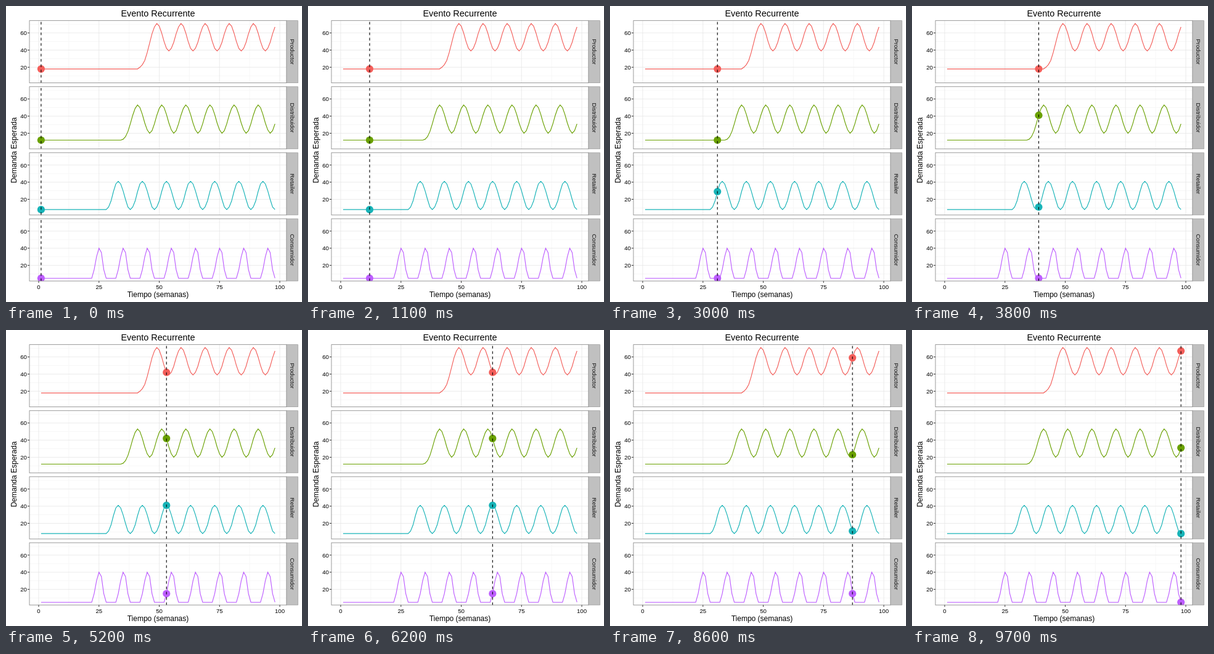
Animation, 480 px wide and 480 px high, one loop 9800 ms. Source, as an HTML page:

```html
<!DOCTYPE html>
<html lang="es">
<head>
<meta charset="utf-8">
<title>Evento Recurrente</title>
<style>
  html, body { margin: 0; width: 100%; height: 100%; overflow: hidden; background: #fff; }
  svg { display: block; width: 480px; height: 480px; font: 9.6px "Liberation Sans", Arial, sans-serif; }
</style>
</head>
<body>
<svg id="chart" viewBox="0 0 480 480"></svg>
<script>
const WEEKS = 98, STEP = 100;
const LEFT = 38, RIGHT = 455, STRIP_END = 473.5, TOP = 23.7, HEIGHT = 101, PITCH = 107.1;
const chart = document.getElementById('chart');

function add(parent, tag, attrs, text) {
  const el = document.createElementNS('http://www.w3.org/2000/svg', tag);
  for (const key in attrs) el.setAttribute(key, attrs[key]);
  if (text !== undefined) el.textContent = text;
  parent.append(el);
  return el;
}
const line = (parent, x1, y1, x2, y2, stroke, width, extra) =>
  add(parent, 'line', { x1, y1, x2, y2, stroke, 'stroke-width': width, ...extra });
const label = (text, x, y, extra) =>
  add(chart, 'text', { x, y, 'text-anchor': 'middle', ...extra }, text);

const xAt = week => 53 + 3.91 * week;
const yAt = (value, row) => 127.1 + PITCH * row - 1.39 * value;

// Each supplier orders 1.5 times a delayed five-week average of its client's demand.
const consumer = week => week < 23 ? 5 : [5, 5, 5, 15, 30, 40, 35, 15, 5, 5][week % 10];
const supplier = client => week => {
  let sum = 0;
  for (let lag = 6; lag <= 10; lag++) sum += client(week - lag);
  return Math.round(sum * 3 / 10);
};
const retailer = supplier(consumer);
const distributor = supplier(retailer);
const producer = supplier(distributor);

const panels = [
  ['Productor', '#f35e5a', producer],
  ['Distribuidor', '#69a000', distributor],
  ['Retailer', '#17b3b7', retailer],
  ['Consumidor', '#bd5eff', consumer]
].map(([name, color, demand], row) => {
  const top = TOP + PITCH * row, bottom = top + HEIGHT, middle = top + HEIGHT / 2;
  const clip = add(chart, 'clipPath', { id: 'clip' + row });
  add(clip, 'rect', { x: LEFT, y: top, width: RIGHT - LEFT, height: HEIGHT });
  const plot = add(chart, 'g', { 'clip-path': `url(#clip${row})` });

  const grid = (first, stroke, width) => {
    for (let v = 10 + first * 10; v <= 70; v += 20)
      line(plot, LEFT, yAt(v, row), RIGHT, yAt(v, row), stroke, width);
    for (let w = first ? 0 : 12.5; w <= 100; w += 25)
      line(plot, xAt(w), top, xAt(w), bottom, stroke, width);
  };
  grid(0, '#f7f7f7', 1);
  grid(1, '#e6e6e6', 0.8);

  const values = Array.from({ length: WEEKS }, (_, i) => demand(i + 1));
  const points = values.map((v, i) => `${xAt(i + 1).toFixed(2)},${yAt(v, row).toFixed(2)}`).join(' ');
  add(plot, 'polyline', { points, fill: 'none', stroke: color, 'stroke-width': 1.15 });
  const dot = add(plot, 'circle', { r: 6.1, fill: color });
  const cursor = line(plot, 0, bottom, 0, top, '#000', 1.1, { 'stroke-dasharray': '4.3 4.3' });

  add(chart, 'rect', { x: LEFT, y: top, width: RIGHT - LEFT, height: HEIGHT,
    fill: 'none', stroke: '#808080', 'stroke-width': 0.8 });
  add(chart, 'rect', { x: RIGHT, y: top, width: STRIP_END - RIGHT, height: HEIGHT,
    fill: '#c0c0c0', stroke: '#909090', 'stroke-width': 0.6 });
  label(name, 0, 0, { transform: `translate(461 ${middle}) rotate(90)`, fill: '#111' });

  for (const v of [20, 40, 60]) {
    line(chart, 35, yAt(v, row), LEFT, yAt(v, row), '#222', 0.9);
    label(v, 33.8, yAt(v, row) + 3.6, { 'text-anchor': 'end' });
  }
  return { values, dot, cursor, row };
});

const base = TOP + PITCH * 3 + HEIGHT;
for (let w = 0; w <= 100; w += 25) {
  line(chart, xAt(w), base, xAt(w), base + 3, '#222', 0.9);
  label(w, xAt(w), 459.3);
}
label('Evento Recurrente', 246.5, 17, { 'font-size': 14.4 });
label('Tiempo (semanas)', 246.5, 472, { 'font-size': 12 });
label('Demanda Esperada', 0, 0, { 'font-size': 12, transform: 'translate(17.3 234) rotate(-90)' });

function draw() {
  const index = Math.floor(performance.now() / STEP) % WEEKS;
  const x = xAt(index + 1);
  for (const { values, dot, cursor, row } of panels) {
    dot.setAttribute('cx', x);
    dot.setAttribute('cy', yAt(values[index], row));
    cursor.setAttribute('x1', x);
    cursor.setAttribute('x2', x);
  }
  requestAnimationFrame(draw);
}
draw();
</script>
</body>
</html>
```
